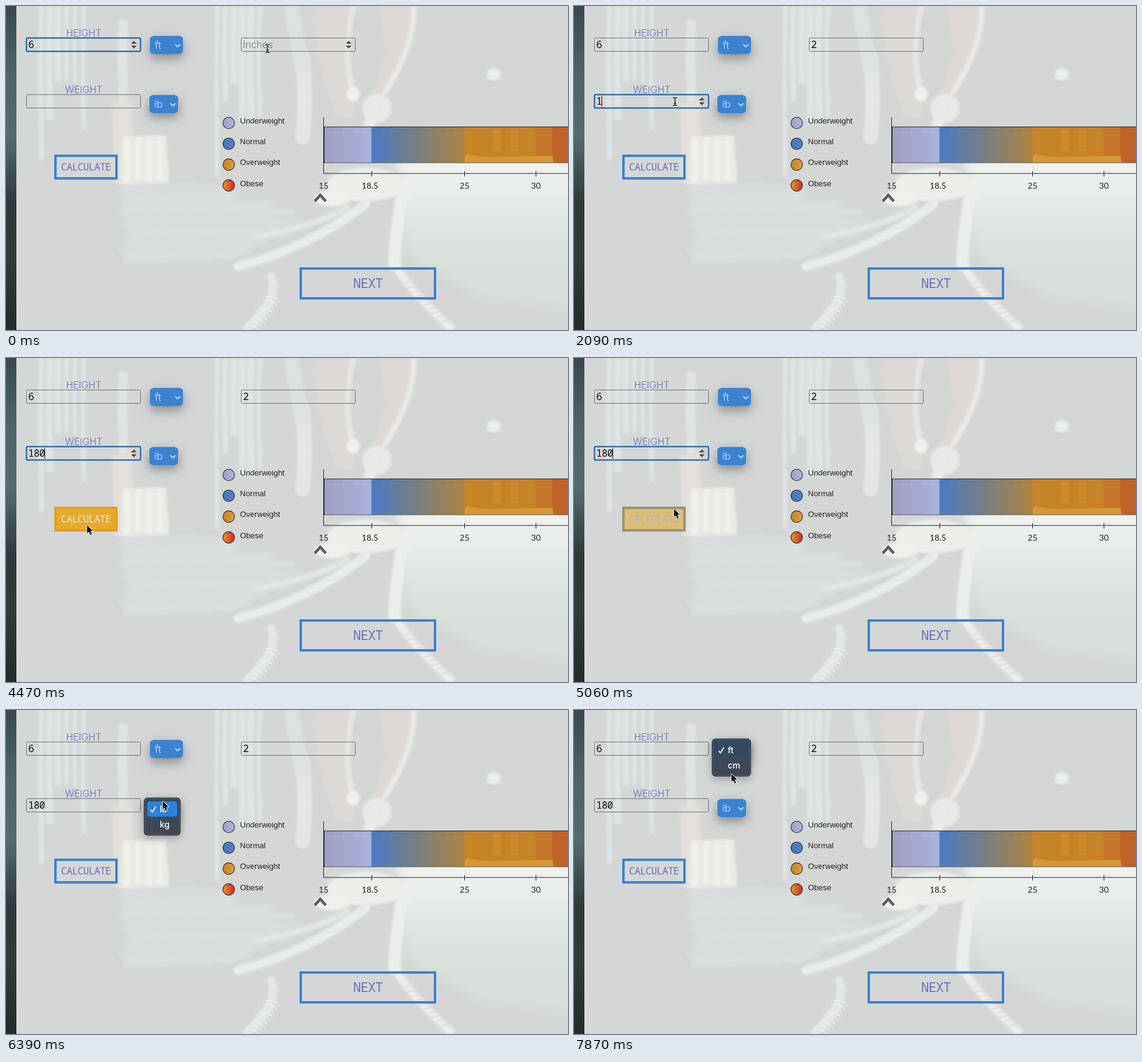
An HTML page with a canvas for the animation above (8000 ms loop, 921 by 532 pixels).

```html
<!DOCTYPE html>
<html lang="en">
<head>
<meta charset="utf-8">
<title>BMI form</title>
<style>
html, body { margin: 0; width: 100%; height: 100%; overflow: hidden; background: #d5d7d6; }
canvas { display: block; }
</style>
</head>
<body>
<canvas id="stage" width="921" height="532"></canvas>
<script>
const W = 921, H = 532, LOOP = 8000, TICK = 148.3;
const canvas = document.getElementById('stage');
let ctx = canvas.getContext('2d');

const BLUE = '#3b82d3', VIOLET = '#6a6cbf';
const SANS = 'Inter, sans-serif', MONO = '"Noto Sans Mono", monospace';

// Pointer glides: from tick, to tick, end point
const GLIDES = [
  [5, 9, 165, 157], [19, 24, 132, 273], [33, 36, 252, 168],
  [38, 41, 256, 196], [41, 43, 256, 148], [43, 48, 259, 72], [51, 53, 257, 103]
];

const clamp = u => Math.min(1, Math.max(0, u));
const smooth = u => u * u * (3 - 2 * u);
const easeOut = u => 1 - (1 - u) ** 2;
const between = (n, a, b) => n >= a && n < b;
const mix = (a, b, p) => `rgb(${a.map((v, i) => Math.round(v + (b[i] - v) * p))})`;

let seed = 7;
const rnd = (a, b) => {
  seed = (seed * 16807) % 2147483647;
  return a + (b - a) * seed / 2147483647;
};

function text(str, x, y, font, color, align = 'left', spacing = 0) {
  ctx.font = font;
  ctx.fillStyle = color;
  ctx.textAlign = align;
  ctx.letterSpacing = spacing + 'px';
  ctx.fillText(str, x, y);
}

function trace(points, closed) {
  ctx.beginPath();
  for (let i = 0; i < points.length; i += 2) ctx.lineTo(points[i], points[i + 1]);
  if (closed) ctx.closePath();
}

function fillPoly(color, ...points) {
  trace(points, true);
  ctx.fillStyle = color;
  ctx.fill();
}

function line(color, width, ...points) {
  trace(points);
  ctx.strokeStyle = color;
  ctx.lineWidth = width;
  ctx.stroke();
}

function roundBox(x, y, w, h, r) {
  ctx.beginPath();
  ctx.roundRect(x, y, w, h, r);
}

function ramp(x0, y0, x1, y1, ...colors) {
  const g = ctx.createLinearGradient(x0, y0, x1, y1);
  colors.forEach((c, i) => g.addColorStop(i / (colors.length - 1), c));
  return g;
}

function brush(color, width, x0, y0, cx, cy, x1, y1) {
  ctx.strokeStyle = color;
  ctx.lineWidth = width;
  ctx.beginPath();
  ctx.moveTo(x0, y0);
  ctx.quadraticCurveTo(cx, cy, x1, y1);
  ctx.stroke();
}

function spot(color, x, y, rx, ry) {
  ctx.fillStyle = color;
  ctx.beginPath();
  ctx.ellipse(x, y, rx, ry, 0, 0, 7);
  ctx.fill();
}

function paintGround() {
  ctx.filter = 'blur(3px)';
  for (let y = 294; y < 420; y += 5) {
    const bulge = Math.sin((y - 285) / 150 * Math.PI);
    line('#dae0e0', rnd(4, 8), 205 - rnd(0, 20), y, rnd(260, 320) + 170 * bulge, y - 3);
  }
  ctx.filter = 'blur(8px)';
  ctx.fillStyle = ramp(0, 256, 0, 440, '#eff2ef', '#eaeeeb', '#dfe6e2', '#dae2dd', '#d8dfdb');
  trace([640, 250, W + 20, 250, W + 20, 500, 780, 480, 655, 410], true);
  ctx.fill();
}

function paintTrees() {
  ctx.filter = 'blur(2px)';
  for (const [x, count] of [[58, 6], [346, 6]])
    for (let i = 0; i < count; i++) {
      const tx = x + i * 14, end = rnd(110, 200) + (i ? 0 : 110);
      brush('#dee4e4', rnd(6, 13), tx, -10, tx - 3, end / 2, tx, end);
    }
  brush('#e0e4e3', 16, 192, 30, 190, 80, 192, 150);
  brush('#e4e6e3', 24, 484, 80, 494, 150, 486, 215);
  brush('#dde1df', 24, 468, 10, 480, 70, 486, 100);
}

// Pale walking silhouette
function paintFigure() {
  fillPoly('#ddd9d6', 502, 0, 574, 0, 560, 70, 576, 140, 568, 185, 540, 180, 512, 90);
  fillPoly('#dfd9d5', 612, 0, 670, 0, 660, 70, 622, 150, 600, 150, 622, 80);
  brush('#e4e6e4', 9, 570, 0, 552, 65, 566, 135);
  brush('#e8eae8', 9, 668, 0, 672, 60, 622, 140);
  spot('#eff1ee', 569, 145, 11, 12);
  spot('#e7e9e6', 608, 168, 24, 24);
  brush('#e8eae7', 18, 600, 170, 600, 185, 592, 205);
  spot('#e9eeeb', 799, 112, 12, 10);
}

function paintStones() {
  fillPoly('#e4dfda', 174, 157, 207, 155, 210, 290, 178, 294);
  fillPoly('#e9e9e4', 190, 214, 262, 212, 268, 290, 186, 293);
  for (let x = 198; x < 264; x += 18) brush('#f0efea', 11, x, 222, x, 250, x, 283);
}

function paintPath() {
  spot('#eceeea', 590, 293, 65, 28);
  spot('#eef0ec', 535, 316, 30, 13);
  brush('#e7ebe9', 15, 590, 325, 500, 395, 380, 428);
  brush('#e2e7e5', 9, 560, 330, 500, 365, 410, 378);
  brush('#eceeec', 20, 656, 295, 640, 340, 636, 425);
  brush('#eceeec', 13, 636, 420, 650, 455, 728, 528);
  brush('#e3e7e5', 14, 435, 445, 448, 485, 395, 530);
  ctx.filter = 'blur(1px)';
  for (let i = 0; i < 10; i++) {
    brush('#eaedeb', 2, 425 - i * 4, 478 + i * 6, 440 - i * 4, 474 + i * 6, 448 - i * 4, 486 + i * 6);
    brush('#d8dbd9', 2, 648 + i * 7, 458 + i * 7, 658 + i * 7, 450 + i * 7, 668 + i * 7, 456 + i * 7);
  }
}

function paintForest() {
  ctx.fillStyle = '#d5d7d6';
  ctx.fillRect(0, 0, W, H);
  ctx.lineCap = 'round';
  paintGround();
  paintTrees();
  paintFigure();
  paintStones();
  paintPath();
  ctx.filter = 'none';
  ctx.lineCap = 'butt';
  ctx.fillStyle = ramp(0, 0, 0, H, '#39494d', '#4d6365', '#546c6c', '#2f3b3b', '#303b38', '#222b2a');
  ctx.fillRect(0, 0, 17, H);
}

function paintLegend() {
  const rows = [
    ['Underweight', '#9fa3cc', '#adb3da'], ['Normal', '#4c74b5', '#587fbd'],
    ['Overweight', '#cd8828', '#dc9a38'], ['Obese', '#e08a2c', '#d8352e']
  ];
  rows.forEach(([name, a, b], i) => {
    const y = 192 + i * 34.2;
    spot(ramp(358, 0, 372, 0, a, b), 365, y, 9.5, 9.5);
    ctx.strokeStyle = '#2a2c30';
    ctx.lineWidth = 1.1;
    ctx.stroke();
    text(name, 383.5, y + 1, '13px "Liberation Sans", Arial, sans-serif', '#222');
  });
}

function paintScale() {
  const bands = [
    [521, 599, [161, 161, 196], [167, 176, 220], 5],
    [599, 751, [77, 123, 190], [167, 131, 70], 10],
    [751, 868, [199, 131, 39], [200, 130, 40], 1],
    [868, 921, [198, 118, 41], [194, 99, 42], 2]
  ];
  for (const [a, b, from, to, steps] of bands) {
    const w = (b - a) / steps;
    for (let i = 0; i < steps; i++) {
      const x = Math.round(a + i * w);
      ctx.fillStyle = mix(from, to, steps > 1 ? i / (steps - 1) : 0);
      ctx.fillRect(x, 199, Math.round(a + (i + 1) * w) - x, 58);
    }
  }
  fillPoly('#d39a35', 752, 244, 790, 248, 896, 246, 897, 257, 752, 257);
  ctx.fillStyle = 'rgba(222,150,50,.3)';
  for (const x of [798, 826]) ctx.fillRect(x, 202, 13, 36);

  line('#25282a', 1, W, 198.5, 521.5, 198.5, 521.5, 258);
  line('rgba(50,48,46,.7)', 1, 521, 257.5, W, 257.5);
  line('#222', 1, 520.5, 183, 520.5, 275, W, 275);
  for (const [label, x, shift] of [['15', 520.5, 0], ['18.5', 599.5, -3], ['25', 751.5, 0], ['30', 868.5, 0]]) {
    if (x > 521) line('#222', 1, x, 271, x, 280);
    text(label, x + shift, 299.5, '13.6px Lato, sans-serif', '#222', 'center');
  }
  line('#58595b', 4.4, 506, 320.5, 515, 310.5, 524, 320.5);
}

function select(label, x, y, w) {
  ctx.fillStyle = BLUE;
  roundBox(x, y, w, 29, 6);
  for (const [dy, blur, a] of [[8, 16, .2], [6, 20, .19], [0, 0, 0]]) {
    ctx.shadowColor = `rgba(0,0,0,${a})`;
    ctx.shadowBlur = blur;
    ctx.shadowOffsetY = dy;
    ctx.fill();
  }
  text(label, x + 8, y + 20.5, '300 16.5px ' + SANS, '#dfe3ee');
  const cx = x + w - 8.5, cy = y + 15.5;
  line('#e2e5ee', 1.7, cx - 4.3, cy - 2.2, cx, cy + 2.1, cx + 4.3, cy - 2.2);
}

function over([px, py], x, y, w, h) {
  return between(px, x, x + w) && between(py, y, y + h);
}

function field(x, y, value, { focus, spin, caret, hint } = {}) {
  roundBox(x + .5, y + .5, 187, 22, 2);
  ctx.strokeStyle = focus ? '#1259a8' : '#6f7171';
  ctx.lineWidth = focus ? 2 : 1;
  ctx.stroke();
  if (value) text(value, x + 3.5, y + 17, '16px ' + MONO, '#0b0b0b', 'left', -.6);
  else if (hint) text(hint, x + 3, y + 17, '300 16px ' + SANS, '#757777');
  if (caret) {
    ctx.fillStyle = '#111';
    ctx.fillRect(x + 4 + value.length * 9 - (value ? 1 : 0), y + 3, 1, 17);
  }
  if (spin)
    for (const s of [-1, 1])
      fillPoly('#4a4a4a', x + 172, y + 11.5 + s * 1.5, x + 176.5, y + 11.5 + s * 6.5, x + 181, y + 11.5 + s * 1.5);
}

function button(label, x, y, w, h, size, spacing, hover = 0) {
  if (hover) {
    ctx.fillStyle = `rgba(228,170,44,${hover})`;
    ctx.fillRect(x, y, w, h);
  }
  ctx.strokeStyle = mix([59, 130, 211], [221, 162, 40], hover);
  ctx.lineWidth = 4;
  ctx.strokeRect(x + 2, y + 2, w - 4, h - 4);
  text(label, x + w / 2, y + h / 2 + size * .36, size + 'px ' + MONO,
    mix([106, 108, 191], [232, 229, 222], hover), 'center', spacing);
}

function menu(x, y, w, items, mouse, lit) {
  ctx.save();
  ctx.shadowColor = 'rgba(0,0,0,.3)';
  ctx.shadowBlur = 14;
  ctx.shadowOffsetY = 4;
  ctx.fillStyle = ramp(0, y, 0, y + 62, '#2d4a62', '#3a4a5c', '#42454f');
  roundBox(x, y, w, 62, 6);
  ctx.fill();
  ctx.restore();
  ctx.lineWidth = 1;
  ['#14181c', 'rgba(255,255,255,.22)'].forEach((color, i) => {
    ctx.strokeStyle = color;
    roundBox(x + i + .5, y + i + .5, w - 1 - 2 * i, 61 - 2 * i, 6 - i);
    ctx.stroke();
  });
  items.forEach((label, i) => {
    if (over(mouse, x, y + 3 + i * 25, w, 25)) {
      ctx.fillStyle = lit;
      roundBox(x + 5.5, y + 6 + i * 25, w - 11, 25, 4);
      ctx.fill();
    }
    text(label, x + 26, y + 24 + i * 25, '500 14px ' + SANS, '#fff');
  });
  line('#fff', 1.7, x + 11, y + 20, x + 14, y + 23.5, x + 19.5, y + 14.5);
}

function pointerAt(n) {
  let x = 428, y = 70;
  for (const [from, to, tx, ty] of GLIDES) {
    const u = smooth(clamp((n - from) / (to - from)));
    x += (tx - x) * u;
    y += (ty - y) * u;
  }
  return [Math.round(x), Math.round(y)];
}

function drawPointer([x, y], beam) {
  ctx.save();
  ctx.translate(x, y);
  if (beam) {
    for (const [color, w] of [['rgba(255,255,255,.8)', 3], ['#111', 1.3]]) {
      for (const s of [-1, 1])
        line(color, w, .5 + 3.5 * s, -6.5, .5 + 1.5 * s, -6.5, .5, -5, .5, 5, .5 + 1.5 * s, 6.5, .5 + 3.5 * s, 6.5);
      line(color, w, -1.5, 2.5, 2.5, 2.5);
    }
  } else {
    const arrow = [1, 2, 1, 15, 4, 12.2, 6.2, 17.4, 8.5, 16.4, 6.3, 11.4, 10.4, 11.2];
    ctx.lineJoin = 'round';
    line('#fff', 1.7, ...arrow, 1, 2);
    fillPoly('#000', ...arrow);
  }
  ctx.restore();
}

function makeBackdrop() {
  const layer = document.createElement('canvas'), main = ctx;
  layer.width = W;
  layer.height = H;
  ctx = layer.getContext('2d');
  paintForest();
  paintLegend();
  paintScale();
  text('HEIGHT', 127.5, 49.5, '300 15.6px ' + SANS, VIOLET, 'center');
  text('WEIGHT', 127.5, 142.5, '300 15.6px ' + SANS, VIOLET, 'center');
  select('ft', 236, 49.5, 54);
  select('lb', 235, 146.5, 47);
  button('NEXT', 481, 429, 224, 53, 22, -1.1);
  ctx = main;
  return layer;
}

const backdrop = makeBackdrop();

function draw(t) {
  const n = Math.floor(t / TICK), mouse = pointerAt(n);
  const inHeight = n < 1, inInches = between(n, 1, 10), inWeight = between(n, 10, 36);
  const onInches = over(mouse, 385, 52, 188, 23), onWeight = over(mouse, 33, 145, 188, 23);
  const digits = [14, 15, 17].filter(k => n >= k).length;
  const hover = easeOut(clamp((n - 23) / 4)) - easeOut(clamp((n - 33) / 4));
  const lit = n === 37 || n === 49 ? 'rgba(255,255,255,.1)' : '#2b82dc';

  ctx.drawImage(backdrop, 0, 0);
  field(33, 52, '6', { focus: inHeight, spin: inHeight });
  field(385, 52, n < 2 ? '' : '2', {
    hint: 'Inches', focus: inInches, spin: inInches || onInches, caret: inInches && !between(n, 5, 8)
  });
  field(33, 145, '180'.slice(0, digits), {
    focus: inWeight, spin: inWeight || onWeight,
    caret: inWeight && !between(n, 20, 23) && !between(n, 27, 30)
  });
  button('CALCULATE', 79, 244, 104, 41, 16, -.5, hover);
  if (between(n, 37, 45)) menu(226, 144, 60, ['lb', 'kg'], mouse, lit);
  if (n >= 49) menu(226, 47, 64, ['ft', 'cm'], mouse, lit);
  drawPointer(mouse, onInches || onWeight && n < 36);
}

const start = performance.now();
function loop() {
  draw((performance.now() - start) % LOOP);
  requestAnimationFrame(loop);
}
loop();
</script>
</body>
</html>
```
